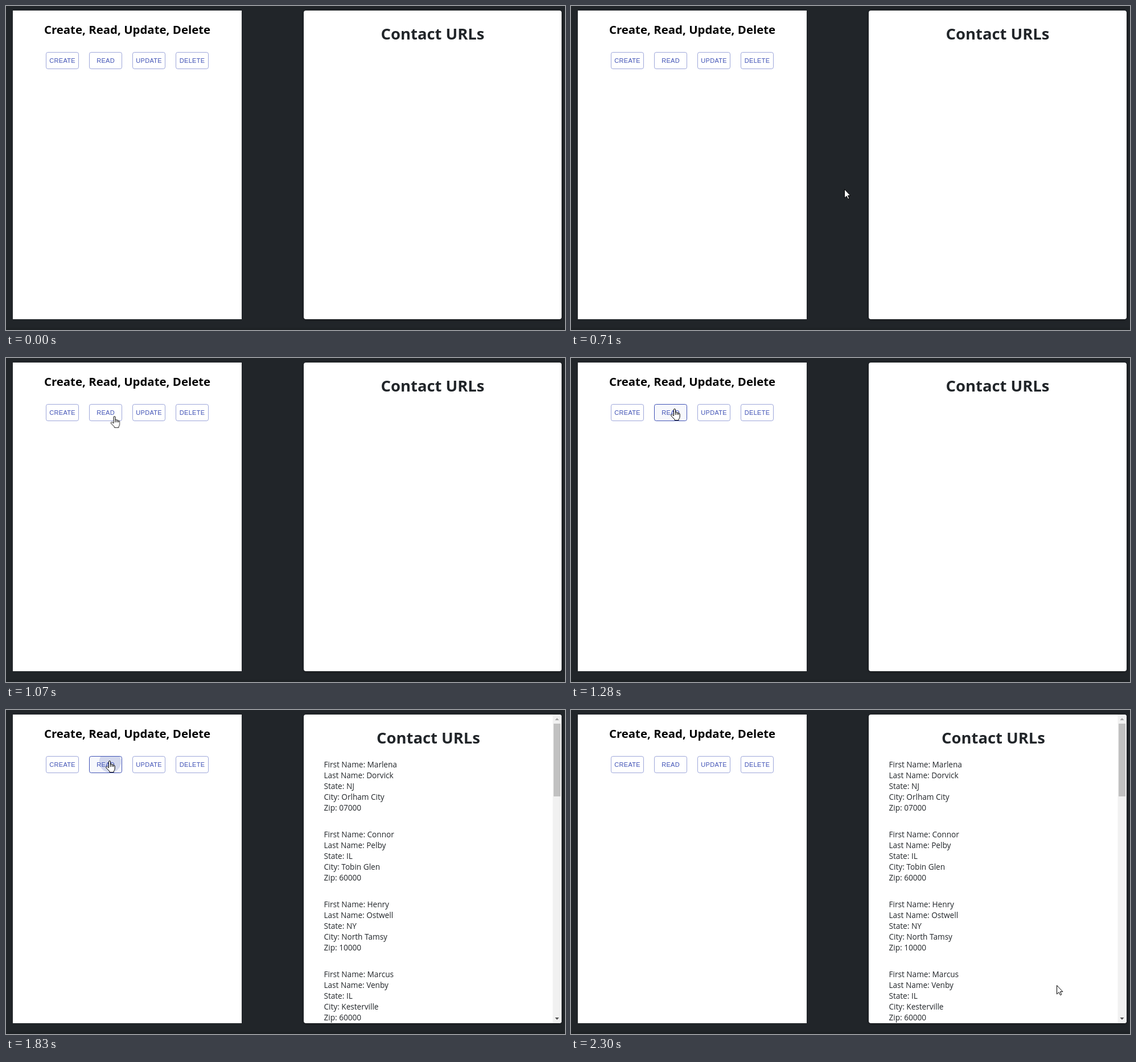
Animation, 982 px wide and 570 px high, one loop 2.35 s. Source, as an HTML page:

```html
<!DOCTYPE html>
<html lang="en">
<head>
<meta charset="utf-8">
<title>Contacts</title>
<style>
  html, body { margin: 0; width: 100%; height: 100%; overflow: hidden; background: #212529; }
  svg { display: block; width: 982px; height: 570px; }
  text { font-family: "Open Sans", "Noto Sans", sans-serif; fill: #212529; }
  .mid { text-anchor: middle; }
  .head { font-size: 20.4px; font-weight: 700; fill: #000; }
  .title { font-size: 27.4px; font-weight: 700; }
  .row { font-size: 13.6px; }
  .btn text { font: 11px "Liberation Sans", Arial, sans-serif; letter-spacing: .31px; fill: #3f51b5; }
  .btn rect { fill: #3f51b5; fill-opacity: 0; stroke: #3f51b5; stroke-opacity: .5; }
  .card { fill: #fff; filter: drop-shadow(0 1px 2px rgba(0, 0, 0, .4)); }
  .pointer { fill: #fff; stroke: #000; stroke-linejoin: round; }
  #list, #cursor, #arrow, #hand { opacity: 0; }
</style>
</head>
<body>
<svg viewBox="0 0 982 570">
  <defs>
    <clipPath id="readClip"><rect x="146" y="81" width="58" height="30" rx="3.6"/></clipPath>
    <clipPath id="cardClip"><rect x="523" y="8" width="453" height="543" rx="4"/></clipPath>
  </defs>
  <rect width="982" height="570" fill="#212529"/>
  <rect y="566" width="982" height="4" fill="#1e2225"/>

  <rect x="12" y="8" width="402" height="543" fill="#fff"/>
  <text class="head mid" x="213" y="49">Create, Read, Update, Delete</text>
  <g id="buttons"></g>
  <g clip-path="url(#readClip)">
    <g id="fade"><g transform="translate(183 91)"><circle id="ripple" r="43" fill="#3f51b5"/></g></g>
  </g>

  <rect class="card" x="523" y="8" width="453" height="543" rx="4"/>
  <text id="empty" class="title mid" x="749.5" y="59">Contact URLs</text>
  <g id="list" clip-path="url(#cardClip)">
    <text class="title mid" x="742" y="59">Contact URLs</text>
    <g id="rows"></g>
    <rect x="960.5" y="8" width="15.5" height="543" fill="#f1f1f1"/>
    <rect x="962" y="24" width="12" height="128" fill="#c1c1c1"/>
    <path d="M964.5 18h7l-3.5-4z" fill="#a3a3a3"/>
    <path d="M964.5 541h7l-3.5 4z" fill="#505050"/>
  </g>

  <g id="cursor" class="pointer">
    <path id="arrow" d="M.5 .5V15.8L4.1 12.5L6.6 17.6L8.8 16.6L6.4 11.6H10.9Z"/>
    <g id="hand" transform="translate(-7 0)">
      <path d="M5.5 12.5V2a1.5 1.5 0 0 1 3 0V7.5a1.4 1.4 0 0 1 2.8 0V8.3a1.3 1.3 0 0 1 2.6 0V9.3a1.2 1.2 0 0 1 2.3 0V14q0 3-2 4.8V20.5H7V19L1.2 13q-1.2-1.6 .3-2.3q1.3-.6 2.4 .7z"/>
      <path d="M8.5 7v4M11.3 8v3M13.9 9v2" fill="none"/>
    </g>
  </g>
</svg>
<script>
const LOOP = 2350;
const $ = id => document.getElementById(id);

function add(parent, tag, attrs, text = '') {
  const el = document.createElementNS('http://www.w3.org/2000/svg', tag);
  for (const k in attrs) el.setAttribute(k, attrs[k]);
  el.textContent = text;
  return parent.appendChild(el);
}

['CREATE', 'READ', 'UPDATE', 'DELETE'].forEach((label, i) => {
  const x = 70 + 76 * i;
  const g = add($('buttons'), 'g', { class: 'btn' });
  add(g, 'rect', { id: label, x: x + .5, y: 81.5, width: 57, height: 29, rx: 3.2 });
  add(g, 'text', { class: 'mid', x: x + 29.1, y: 100 }, label);
});

const fields = ['First Name', 'Last Name', 'State', 'City', 'Zip'];
const contacts = [
  ['Marlena', 'Dorvick', 'NJ', 'Orlham City', '07000'],
  ['Connor', 'Pelby', 'IL', 'Tobin Glen', '60000'],
  ['Henry', 'Ostwell', 'NY', 'North Tamsy', '10000'],
  ['Marcus', 'Venby', 'IL', 'Kesterville', '60000']
];
contacts.forEach((c, i) => fields.forEach((f, j) =>
  add($('rows'), 'text', { class: 'row', x: 558.5, y: 101 + 123 * i + 19 * j }, `${f}: ${c[j]}`)));

// Each step: [ms, style, easing towards the next step]; without easing the value holds.
function play(id, steps) {
  const frames = steps.map(([ms, style, easing = 'step-end']) => ({ offset: ms / LOOP, easing, ...style }));
  frames.push({ ...frames[frames.length - 1], offset: 1 });
  $(id).animate(frames, { duration: LOOP, iterations: Infinity }).startTime = start;
}
const start = document.timeline.currentTime || 0;
const at = (x, y) => ({ transform: `translate(${x}px, ${y}px)` });
const show = o => ({ opacity: o });
const scale = (s, o) => ({ transform: `scale(${s})`, opacity: o });
const hover = (fill, stroke) => ({ fillOpacity: fill, strokeOpacity: stroke });
const SMOOTH = 'cubic-bezier(.4, 0, .2, 1)';

play('cursor', [
  [0, { ...at(847, 559), opacity: 0 }],
  [560, { ...at(847, 559), opacity: 1 }, 'cubic-bezier(.3, .1, .5, 1)'],
  [890, { ...at(223, 156), opacity: 1 }, 'linear'],
  [1070, { ...at(191, 103), opacity: 1 }, 'ease-out'],
  [1100, { ...at(182, 89), opacity: 1 }],
  [2040, { ...at(182, 89), opacity: 1 }, 'cubic-bezier(.5, 0, .8, .7)'],
  [2130, { ...at(436, 189), opacity: 1 }, 'cubic-bezier(.3, .5, .6, 1)'],
  [2300, { ...at(853, 484), opacity: 1 }]
]);
play('arrow', [[0, show(1)], [1045, show(0)], [2070, show(1)]]);
play('hand', [[0, show(0)], [1045, show(1)], [2070, show(0)]]);

play('READ', [
  [0, hover(0, .5)],
  [1070, hover(0, .5), SMOOTH],
  [1290, hover(.04, 1)],
  [2070, hover(.04, 1), SMOOTH],
  [2300, hover(0, .5)]
]);
play('ripple', [
  [0, scale(0, .1)],
  [1650, scale(0, .1), SMOOTH],
  [2200, scale(1, .3)]
]);
play('fade', [[0, show(1)], [1790, show(1), SMOOTH], [2300, show(0)]]);

play('empty', [[0, show(1)], [1800, show(0)]]);
play('list', [[0, show(0)], [1800, show(1)]]);
</script>
</body>
</html>
```
